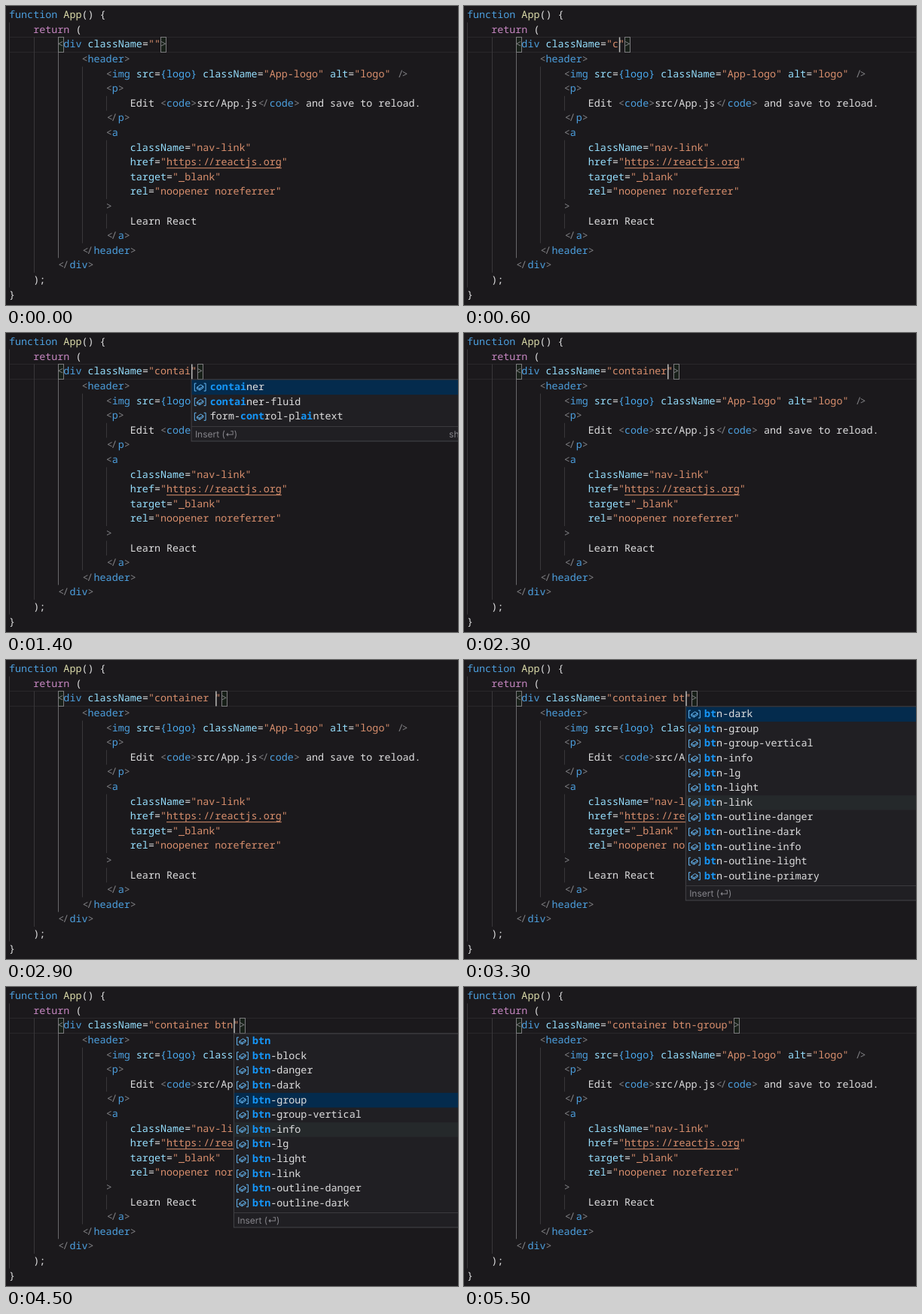
An HTML page for the animation above (5.6 s loop, 600 by 398 pixels).

```html
<!DOCTYPE html>
<html lang="en">
<head>
<meta charset="utf-8">
<title>Class name completion</title>
<style>
  html, body { margin: 0; width: 100%; height: 100%; overflow: hidden; background: #1b191c; }
  svg { display: block; width: 600px; height: 398px; }
  text { font: 13.4px "Noto Sans Mono", "DejaVu Sans Mono", monospace; white-space: pre; text-rendering: geometricPrecision; }
  .hint { font: 12px Inter, "DejaVu Sans", sans-serif; fill: #85848a; }
  .match { font-weight: 700; fill: #1597fa; }
  .icon { fill: none; stroke: #66b8f4; stroke-width: 1; }
</style>
</head>
<body>
<svg id="stage" viewBox="0 0 600 398">
  <g id="code"></g>
  <g id="line"></g>
  <g id="popup"></g>
</svg>
<script>
const LOOP = 5600, LEFT = 4, CHAR = 8.04, ROW = 19.6, BASE = 16.12, ACTIVE = 2;

const INK = {
  k: '#4c9fde', f: '#dcdcaa', r: '#c586c0', t: '#dededf', g: '#808084',
  a: '#96dffe', s: '#d98f6d', v: '#49a9ee'
};

// Each line: column, then tokens as colour key + text.
const CODE = [
  [0, 'kfunction ', 'fApp', 't() {'],
  [4, 'rreturn', 't ('],
  null,
  [12, 'g<', 'kheader', 'g>'],
  [16, 'g<', 'kimg ', 'asrc', 't=', 'v{logo} ', 'aclassName', 't=', 's"App-logo" ', 'aalt', 't=', 's"logo" ', 'g/>'],
  [16, 'g<', 'kp', 'g>'],
  [20, 'tEdit ', 'g<', 'kcode', 'g>', 'tsrc/App.js', 'g</', 'kcode', 'g>', 't and save to reload.'],
  [16, 'g</', 'kp', 'g>'],
  [16, 'g<', 'ka'],
  [20, 'aclassName', 't=', 's"nav-link"'],
  [20, 'ahref', 't=', 's"https://reactjs.org"'],
  [20, 'atarget', 't=', 's"_blank"'],
  [20, 'arel', 't=', 's"noopener noreferrer"'],
  [16, 'g>'],
  [20, 'tLearn React'],
  [16, 'g</', 'ka', 'g>'],
  [12, 'g</', 'kheader', 'g>'],
  [8, 'g</', 'kdiv', 'g>'],
  [4, 't);'],
  [0, 't}']
];

// Indent guides: column, first row, row count.
const GUIDES = [[0, 1, 18], [4, 2, 16], [8, 3, 14], [12, 4, 12], [16, 6, 1], [16, 9, 4], [16, 14, 1]];

const CLASSES = [
  'container', 'container-fluid', 'custom-control', 'custom-control-inline',
  'custom-control-input', 'custom-control-label', 'custom-file', 'custom-file-control',
  'custom-file-input', 'custom-file-label', 'custom-select', 'custom-select-lg',
  'form-control-plaintext',
  'btn', 'btn-block', 'btn-danger', 'btn-dark', 'btn-group', 'btn-group-vertical',
  'btn-info', 'btn-lg', 'btn-light', 'btn-link', 'btn-outline-danger', 'btn-outline-dark',
  'btn-outline-info', 'btn-outline-light', 'btn-outline-primary'
];

// Start time, class value, caret shown, first visible suggestion (-1: closed), selected row.
const STEPS = [
  [0, '', 0, -1],
  [400, '', 1, -1],
  [600, 'c', 1, -1],
  [700, 'co', 1, -1],
  [800, 'co', 1, 0, 0],
  [1000, 'con', 1, 0, 0],
  [1100, 'cont', 1, 0, 0],
  [1200, 'conta', 1, 0, 0],
  [1300, 'contai', 1, 0, 0],
  [1900, 'container', 1, -1],
  [2400, 'container', 0, -1],
  [2900, 'container ', 1, -1],
  [3100, 'container b', 1, -1],
  [3200, 'container bt', 1, 3, 0],
  [3400, 'container btn', 1, 0, 0],
  [3600, 'container btn', 1, 0, 1],
  [3800, 'container btn', 1, 0, 2],
  [4000, 'container btn', 1, 0, 3],
  [4200, 'container btn', 1, 0, 4],
  [5000, 'container btn-group', 1, -1],
  [5500, 'container btn-group', 0, -1]
];

const $ = id => document.getElementById(id);
const colX = col => LEFT + col * CHAR;
const rowY = row => 2.2 + row * ROW;
const esc = s => s.replace(/&/g, '&amp;').replace(/</g, '&lt;').replace(/>/g, '&gt;');
const rect = (x, y, w, h, fill, more = '') =>
  `<rect x="${x}" y="${y}" width="${w}" height="${h}" fill="${fill}" ${more}/>`;

// Pairs drawn closer together, as a coding font joins them.
const JOIN = { '</': [1, -1.2], '/>': [1.2, -1], '//': [0.9, -0.3] };

function codeLine(row, [col, ...tokens]) {
  let out = '';
  for (const token of tokens) {
    for (const part of token.slice(1).split(/(<\/|\/>|\/\/)/)) {
      if (!part) continue;
      const shift = JOIN[part];
      const x = shift ? shift.map((d, i) => colX(col + i) + d).join(' ') : colX(col);
      out += `<text x="${x}" y="${BASE + row * ROW}" fill="${INK[token[0]]}">${esc(part)}</text>`;
      col += part.length;
    }
  }
  return out;
}

function drawCode() {
  let out = rect(LEFT, 41, 600, 1, '#29272a') + rect(LEFT, 61, 600, 1, '#29272a');
  for (const [col, row, count] of GUIDES) {
    out += rect(Math.round(colX(col) + 0.4), rowY(row), 1, count * ROW, col === 8 ? '#68676a' : '#39373a');
  }
  CODE.forEach((line, row) => { if (line) out += codeLine(row, line); });
  out += rect(colX(26), 215.2, 19 * CHAR, 1, INK.s);
  $('code').innerHTML = out;
}

function bracketBox(col) {
  return rect(Math.round(colX(col) + 0.3) + 0.5, 41.5, 7, 20, '#182019', 'stroke="#7c7b7e"');
}

function drawLine(value, caret) {
  const end = 24 + value.length;
  let out = bracketBox(8) + bracketBox(end + 1);
  out += codeLine(ACTIVE, [8, 'g<', 'kdiv ', 'aclassName', 't=', `s"${value}"`, 'g>']);
  if (caret) out += rect(colX(end) + 0.8, 41.5, 1.5, 20, '#b8b8b6');
  $('line').innerHTML = out;
}

// Positions of the query letters in a name, or null if it does not fit.
function matchAt(name, query) {
  const hits = [];
  let at = -1;
  for (const ch of query) {
    at = name.indexOf(ch, at + 1);
    if (at < 0) return null;
    hits.push(at);
  }
  return hits;
}

function label(name, hits) {
  return [...name].map((ch, i) => hits.includes(i) ? `<tspan class="match">${ch}</tspan>` : ch)
    .join('').replace(/<\/tspan><tspan class="match">/g, '');
}

function icon(x, y) {
  return `<path class="icon" transform="translate(${x} ${y})" d="M3 -5H0.6V5H3M13 -5H15.4V5H13` +
    `M3.8 0.2L8.6 -3.2L12.2 -1.2V0.8L7.4 4L3.8 2.2ZM3.8 0.2L7.4 2L12.2 -1.2M7.4 2V4"/>`;
}

function drawPopup(value, first, selected) {
  if (first < 0) { $('popup').innerHTML = ''; return; }
  const query = value.split(' ').pop();
  const items = CLASSES.map(name => [name, matchAt(name, query)])
    .filter(item => item[1]).slice(first, first + 12);
  const x = colX(24 + value.length) + 0.9, top = 62.5;
  const foot = Math.round(top + items.length * ROW + 2.6);
  let out = rect(x, top - 0.5, 430, foot + 20.5 - top, '#201f23', 'stroke="#454448"');
  items.forEach(([name, hits], i) => {
    const y = top + i * ROW;
    if (i === selected) out += rect(x + 0.5, y, 429, ROW, '#042b4d');
    else if (i === 6) out += rect(x + 0.5, y, 429, ROW, '#25292b');
    out += icon(x + 3.6, y + 9.6);
    out += `<text x="${x + 24.7}" y="${y + 13.62}" fill="${INK.t}">${label(name, hits)}</text>`;
  });
  out += rect(x, foot, 430, 1, '#3b3a3e');
  out += `<text class="hint" x="${x + 4.8}" y="${foot + 14.8}">Insert (⏎)</text>`;
  out += `<text class="hint" x="${x + 342}" y="${foot + 14.8}">show more</text>`;
  $('popup').innerHTML = out;
}

let shown = null;
function tick() {
  const t = performance.now() % LOOP;
  const step = STEPS.findLast(s => s[0] <= t);
  if (step !== shown) {
    shown = step;
    const [, value, caret, first, selected] = step;
    drawLine(value, caret);
    drawPopup(value, first, selected);
  }
  requestAnimationFrame(tick);
}

drawCode();
tick();
</script>
</body>
</html>
```
